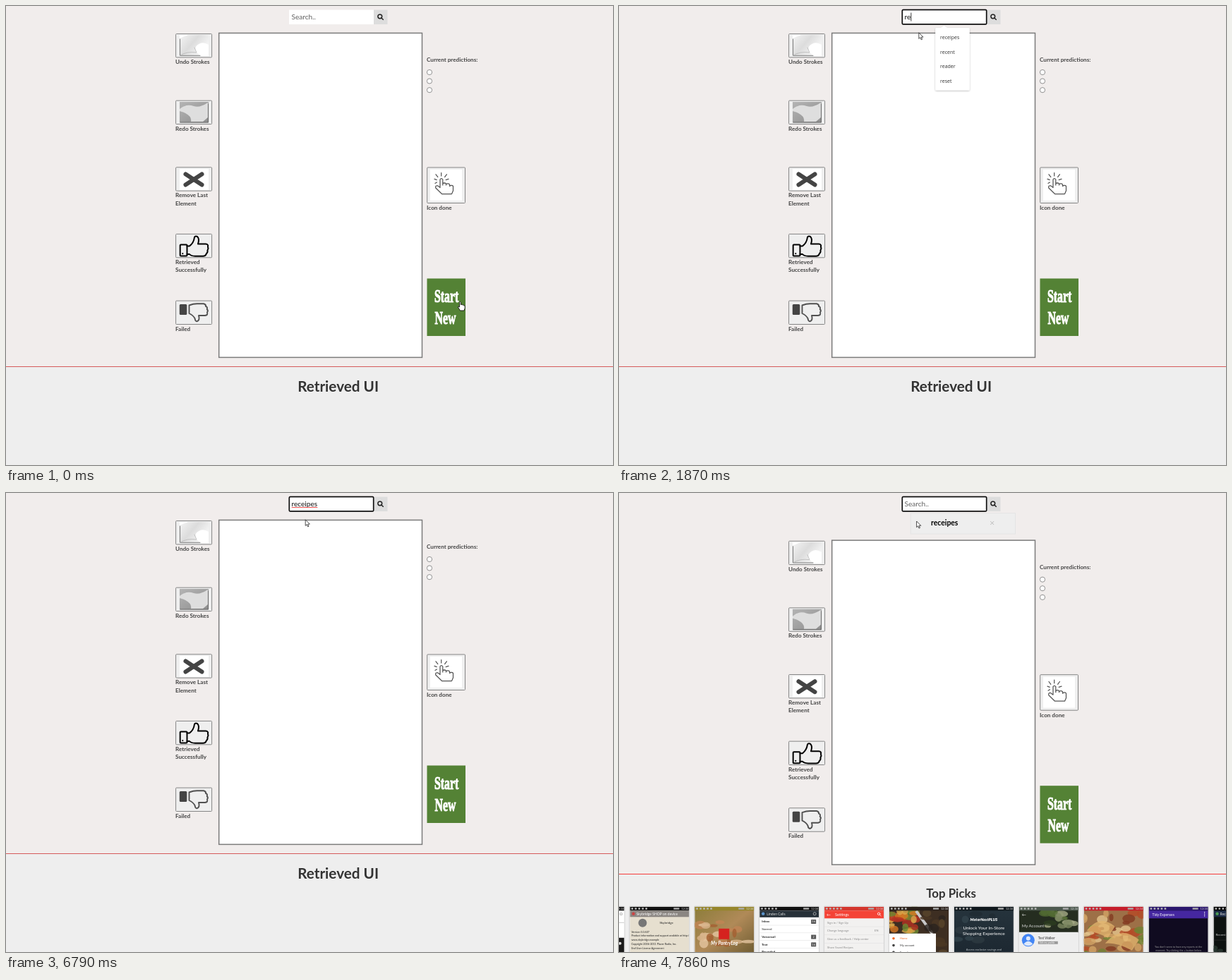
An HTML page for the animation above (7.99 s loop, 860 by 651 pixels).

```html
<!DOCTYPE html>
<html lang="en">
<head>
<meta charset="utf-8">
<title>Sketch search</title>
<style>
html, body { margin: 0; width: 100%; height: 100%; overflow: hidden; background: #eee; }
svg { display: block; width: 860px; height: 651px; font-family: Lato, sans-serif; }
.label { font-size: 8.13px; font-weight: 700; fill: #444; }
.btn { fill: #efefef; stroke: #858585; }
.menu { font: 7px "Open Sans", sans-serif; fill: #333; }
.head { font-weight: 700; fill: #333; text-anchor: middle; }
.line { fill: none; stroke-linecap: round; stroke-linejoin: round; }
</style>
</head>
<body>
<svg id="stage" viewBox="0 0 860 651" width="860" height="651">
  <defs>
    <linearGradient id="undoTone" x2="1" y2=".6"><stop stop-color="#f4f4f4"/><stop offset=".5" stop-color="#dcdcdc"/><stop offset="1" stop-color="#f8f8f8"/></linearGradient>
    <linearGradient id="redoTone" x2="1" y2="1"><stop stop-color="#b4b4b4"/><stop offset="1" stop-color="#8e8e8e"/></linearGradient>
    <linearGradient id="warm" x2="1" y2="1"><stop stop-color="#8b7c3a"/><stop offset=".5" stop-color="#b08a58"/><stop offset="1" stop-color="#6b5a30"/></linearGradient>
    <linearGradient id="navy" x2="0" y2="1"><stop stop-color="#26343d"/><stop offset="1" stop-color="#1c2730"/></linearGradient>
    <filter id="shade" x="-20%" y="-20%" width="140%" height="150%"><feDropShadow dx="0" dy="1" stdDeviation="1.3" flood-opacity=".28"/></filter>
    <clipPath id="card"><rect width="84" height="70"/></clipPath>
  </defs>

  <rect width="860" height="651" fill="#eee"/>
  <rect id="upper" width="860" height="511" fill="#f1edec"/>
  <rect id="rule" width="860" height="1"/>

  <g id="page">
    <rect x="301.7" y="38.4" width="287.8" height="460" fill="#fff" stroke="#7b7b7b" stroke-width="1.5"/>
    <g id="buttons"></g>

    <g id="undo">
      <rect x="246" y="41" width="41" height="30" fill="#fff"/>
      <path d="M246 46L258 41H287V55Q279 50 273 54Q266 58 269 65L275 70H246Z" fill="url(#undoTone)"/>
      <path d="M246.5 47V70.3H275" class="line" stroke="#777"/>
      <path d="M247 70Q256 64 270 66L267 59" class="line" stroke="#b5b5b5" stroke-width=".8"/>
    </g>
    <g id="redo">
      <rect x="246" y="136" width="41" height="29.5" fill="url(#redoTone)"/>
      <path d="M246 146Q255 138 266 142Q274 145 286 137V158L279 164H262Q264 154 246 149Z" fill="#dedede"/>
      <path d="M247 165H286.5V139" class="line" stroke="#666"/>
    </g>

    <rect x="246" y="231" width="41" height="30" fill="#fff"/>
    <path d="M254.5 238.5L277.5 253.5M277.5 238.5L254.5 253.5" class="line" stroke="#444" stroke-width="6"/>

    <g class="line" stroke="#000" stroke-width="2">
      <rect x="246.7" y="338.5" width="9.8" height="16" rx="1"/>
      <path d="M256.5 340.5H260Q266 336 267 328Q268 325.8 271 327Q274.5 330 272 337.5H283Q287 338 286 341.5Q287.2 344 285.5 346.5Q286 350 284 351Q283 354.8 279 354.8H268Q262 354.5 260 352H256.5"/>
      <path d="M250.3 351V351.2"/>
    </g>
    <rect x="245.8" y="423" width="10.5" height="15" rx="1.5" fill="#444"/>
    <path d="M259.5 436V424.5Q266 422 272 422.3H280Q283.5 423 283 426Q286 427 284.7 430Q287 432 285 434.5Q286.5 438.5 282 439H273Q275 446 270.5 447.3Q268 447 267.5 443Q265 438.5 259.5 436Z" class="line" stroke="#505050" stroke-width="1.9"/>

    <text class="label" x="596" y="79.2">Current predictions:</text>
    <g fill="#fff" stroke="#858585" stroke-width=".9">
      <circle cx="600" cy="94" r="3.6"/><circle cx="600" cy="106.5" r="3.6"/><circle cx="600" cy="119.2" r="3.6"/>
    </g>

    <rect class="btn" x="596.7" y="229" width="53.8" height="50.5" rx="1"/>
    <rect x="601" y="232" width="45" height="44" fill="#fff"/>
    <path d="M615 257V246Q616.8 243.2 618.8 246V254V252Q621 250 623.5 252V254V252.8Q626 251 628.5 253V255.5Q631.5 253 633.5 255.5V262L631.5 266.5H617.5L608.8 258Q608 254.5 611.5 254.8L615 257.5M616.7 241V236.5M611.8 242.6L609 238.8M621.6 242.6L624.4 238.8M610.2 246.6L607 245.4M623.2 246.6L627 245.4M610.4 250L608 251.5" class="line" stroke="#555" stroke-width="1.25"/>
    <text class="label" x="596" y="288.9">Icon done</text>

    <rect x="596.5" y="386.5" width="54.5" height="81.5" fill="#548235"/>
    <g fill="#fff" stroke="#fff" stroke-width=".7" font-family="Liberation Serif, serif" font-weight="700" font-size="15.8">
      <text transform="translate(607 420) scale(1 1.6)">Start</text>
      <text transform="translate(607.5 451.3) scale(1 1.6)">New</text>
    </g>
  </g>

  <rect x="521" y="5.5" width="19.5" height="20.5" fill="#ddd"/>
  <g class="line" stroke="#222" stroke-width="1.5"><circle cx="529.8" cy="14.8" r="2.9"/><path d="M532.2 17.2L534.3 19.3"/></g>
  <rect x="401" y="5.5" width="120" height="20.5" fill="#fff"/>
  <rect id="focus" x="401.3" y="5.3" width="119.4" height="20.6" rx="1.5" fill="none" stroke="#101010" stroke-width="1.7"/>
  <text id="query" x="404.5" y="18.9" font-size="10.1"></text>
  <rect id="squiggle" x="404.7" y="20" height="1" fill="#f05050"/>
  <rect id="caret" y="9.5" width=".9" height="12" fill="#222"/>

  <text id="heading" class="head" x="470.6"></text>
  <g id="results">
    <rect x="413.2" y="28.7" width="148.3" height="29.3" fill="#eee" stroke="#e4e4e4"/>
    <text x="442" y="46.4" font-size="10.4" font-weight="700">receipes</text>
    <path d="M526.3 40.2L531 44.9M531 40.2L526.3 44.9" stroke="#b0b0b0" stroke-width=".9"/>
    <g id="slots"></g>
    <g id="cards"></g>
  </g>

  <g id="menu" class="menu">
    <g filter="url(#shade)"><path d="M455 31.5L460.5 28L466 31.5Z" fill="#fff"/><rect id="menuBox" x="448.2" y="31" rx="1.5" fill="#fff"/></g>
    <g id="menuRows"></g>
  </g>

  <g id="hand"><path d="M-2.4 0V-5Q-1.5 -7 -.6 -5V-1.8Q1 -3 1.6 -1.4Q3 -2.2 3.5 -.8Q5.2 -1.4 5.2 .6V3L4 6.5H-1.6L-4.6 1.5Q-4.5 -.4 -2.4 1.5Z" fill="#fff" stroke="#111" stroke-width=".9"/></g>
  <g id="beam" class="line" stroke="#222" stroke-width=".9"><path d="M-2 -4.5H-.6L0 -4L.6 -4.5H2M0 -4V4M-2 4.5H-.6L0 4L.6 4.5H2"/></g>
  <g id="arrow"><path d="M0 0V8.6L2 6.8L3.4 10L4.8 9.4L3.5 6.3H6.2Z" fill="#fff" stroke="#222" stroke-width=".8"/></g>
</svg>

<script>
const LOOP = 7990, SHIFT = 28.7, ENTER = 6930;
const $ = id => document.getElementById(id);
const show = (id, on) => $(id).setAttribute('visibility', on ? 'visible' : 'hidden');
const set = (id, attrs) => { for (const k in attrs) $(id).setAttribute(k, attrs[k]); };
const rect = (x, y, w, h, fill, more = '') => `<rect x="${x}" y="${y}" width="${w}" height="${h}" fill="${fill}" ${more}/>`;
const dot = (x, y, r, fill) => `<circle cx="${x}" cy="${y}" r="${r}" fill="${fill}"/>`;
const text = (x, y, size, fill, s, more = '') => `<text x="${x}" y="${y}" font-size="${size}" fill="${fill}" ${more}>${s}</text>`;
const mid = 'text-anchor="middle"', bold = 'font-weight="700"';

function random(seed) {
  return () => (seed = seed * 16807 % 2147483647) / 2147483647;
}

// soft heap of food-like patches
function food(seed, n, x, y, w, h, tones) {
  const r = random(seed);
  let out = '';
  for (let i = 0; i < n; i++) {
    out += `<ellipse cx="${x + r() * w}" cy="${y + r() * h}" rx="${3 + r() * 7}" ry="${2 + r() * 5}" fill="${tones[i % tones.length]}" opacity=".8"/>`;
  }
  return out;
}

const labels = [['Undo Strokes'], ['Redo Strokes'], ['Remove Last', 'Element'], ['Retrieved', 'Successfully'], ['Failed']];
$('buttons').innerHTML = labels.map((lines, i) => {
  const y = 39.5 + 94.65 * i;
  return `<rect class="btn" x="240.6" y="${y}" width="51" height="33.4" rx="1"/>` +
    lines.map((s, j) => `<text class="label" x="240" y="${y + 42.4 + 11.6 * j}">${s}</text>`).join('');
}).join('');

function statusBar(fill) {
  let out = rect(0, 0, 84, 5.5, fill);
  for (let i = 0; i < 5; i++) out += rect(2 + i * 5, 1.5, 2.6, 2.4, '#bbb');
  return out + rect(62, 1.5, 8, 2.4, '#aaa') + text(73, 4.4, 4, '#ddd', '12:34');
}

const cards = [
  rect(0, 0, 84, 70, '#fff') + statusBar('#111') + text(77, 12, 6, '#777', '⊙') + rect(76, 22, 8, 1, '#ccc') + rect(76, 44, 8, 22, '#1a1a1a') + dot(78, 52, 2, '#ddd'),

  rect(0, 0, 84, 70, '#e6dfcf') + statusBar('#111') + rect(0, 5.5, 84, 9, '#8b8682') +
    dot(5, 10, 2.2, '#c44') + text(9, 12, 5, '#fff', 'Skybridge SHOP on device') +
    dot(18, 23, 6, '#777') + text(42, 24, 4.5, '#222', 'Skybridge') +
    ['Version 5.0.607', 'Product information and support available at http:/', 'www.skybridge.example',
     'Copyright 2006-2011 Plover Radio, Inc.', 'End User License Agreement']
      .map((s, i) => text(2, 37 + i * 5.7, 3.7, '#222', s)).join(''),

  rect(0, 0, 84, 70, 'url(#warm)') + food(17, 20, 8, 17, 68, 38, ['#c28555', '#d9b48b', '#a65f31', '#e5c6a0']) +
    statusBar('#96862c') + rect(34, 31, 15, 15, '#d5231f') + text(42, 54.5, 6.5, '#fff', 'My PantryLog', mid + ' font-style="italic" font-weight="700"'),

  rect(0, 0, 84, 70, '#fff') + statusBar('#111') + rect(0, 5.5, 84, 9.5, '#263038') + dot(5, 10, 2.3, '#5a91c8') +
    text(10, 12, 5, '#ddd', 'Linden Calls') + `<circle cx="78" cy="10" r="2" fill="none" stroke="#bbb" stroke-width=".8"/>` +
    ['Inbox', 'Starred', 'Voicemail', 'Text', 'Recorded'].map((s, i) =>
      text(3, 22.5 + i * 10.8, 4.5, '#222', s, i == 1 ? '' : bold) + rect(0, 26 + i * 10.8, 84, .5, '#ddd') +
      (i == 1 || i == 4 ? '' : rect(73, 18.2 + i * 10.8, 7, 6, '#555') + text(76.5, 22.7 + i * 10.8, 4, '#fff', i == 2 ? 2 : 16, mid))).join(''),

  rect(0, 0, 84, 70, '#f2f1f0') + statusBar('#d4362d') + rect(0, 5.5, 84, 11, '#f44336') + text(3, 13.2, 6, '#fff', '←') +
    text(15, 13, 5.6, '#fff', 'Settings') + `<g class="line" stroke="#fff" stroke-width=".8"><circle cx="77" cy="10" r="1.7"/><path d="M78.3 11.3L80 13"/></g>` +
    ['Sign in / Sign Up', 'Change language', 'Give us a feedback / Help center', 'Share Saved Recipes'].map((s, i) =>
      text(4, 24 + i * 11.6, 4.1, '#888', s) + rect(0, 28 + i * 11.6, 84, .5, '#ddd')).join('') + text(71, 35.5, 4, '#888', 'EN'),

  rect(0, 0, 84, 70, '#3d2e22') + food(41, 28, 0, 5, 38, 30, ['#d77824', '#6e8a32', '#b53122', '#d9a84c']) +
    `<path d="M38 6L61 38" stroke="#c8c8c8" stroke-width="4"/>` + food(9, 10, 52, 5, 30, 60, ['#4b3824', '#59452b', '#2b241e']) +
    statusBar('#2a211b') + rect(0, 38, 66, 32, '#fff') +
    ['Home', 'My account', 'Favorites'].map((s, i) =>
      dot(6, 45 + i * 9.8, 1.8, i ? '#444' : '#f06a25') + text(15, 46.5 + i * 9.8, 4, i ? '#333' : '#f06a25', s)).join(''),

  rect(0, 0, 84, 70, 'url(#navy)') + food(5, 7, 4, 8, 75, 58, ['#33434b', '#202b32', '#2d3a41']) + statusBar('#10181d') +
    text(42, 20.5, 5.6, '#fff', 'MotorNestPLUS', mid + ' font-weight="900" font-style="italic"') +
    text(42, 32, 6.5, '#fff', 'Unlock Your In-Store', mid) + text(42, 40, 6.5, '#fff', 'Shopping Experience', mid) +
    text(42, 62, 4, '#c5ccd0', 'Access exclusive savings and', mid),

  rect(0, 0, 84, 70, '#eee') + rect(0, 0, 84, 37, '#252d20') + food(23, 18, 36, 7, 42, 25, ['#526b32', '#7e8962', '#2c3d20', '#a6aa86']) +
    statusBar('#4e5a50') + rect(0, 36, 84, 34, '#eee') + text(4, 13.5, 6, '#fff', '←') + text(4, 29, 6, '#ddd', 'My Account') +
    dot(13, 47.5, 9, '#4285f4') + dot(13, 45, 3, '#dce8fb') + `<path d="M6.5 53Q13 45 19.5 53Q13 58 6.5 53Z" fill="#dce8fb"/>` +
    text(27, 46, 4.7, '#333', 'Test Walker') + rect(27, 49, 28, 4, '#999') + text(29, 52.2, 3.4, '#fff', 'Edit my profile'),

  rect(0, 0, 84, 70, '#9d7047') + food(77, 46, 0, 8, 84, 60, ['#d3a466', '#b64a26', '#708334', '#e5c68e', '#843a21']) +
    `<path d="M4 34Q22 10 44 28L34 44Q18 36 4 34ZM30 52Q52 25 78 47L68 62Q46 50 30 52Z" fill="#e3b66e" opacity=".75"/>` + statusBar('#c51d2b'),

  rect(0, 0, 84, 70, '#100b20') + statusBar('#29156c') + rect(0, 5.5, 84, 11, '#4527a0') + text(5, 13, 5, '#fff', 'Tidy Expenses') +
    [8, 10.5, 13].map(y => dot(79, y, .7, '#fff')).join('') +
    text(42, 58, 3.7, '#999', 'You don’t seem to have any reports at the', mid) + text(42, 63, 3.7, '#999', 'moment. Try clicking the + button below', mid),

  rect(0, 0, 84, 70, '#0d1210') + statusBar('#000') + rect(0, 5.5, 84, 9, '#1d2b45') + dot(5, 10, 2.2, '#4b9b52') + text(9, 12, 5, '#ddd', 'Recipes') +
    text(3, 41, 4.5, '#ccc', 'Recent') + rect(0, 47, 84, .6, '#333') + food(3, 3, 1, 54, 14, 12, ['#283830'])
];

const cardX = i => 14.6 + 91.9 * (i - 1);
$('slots').innerHTML = cards.map((_, i) => rect(cardX(i), 586, 85.3, 80, '#eee', 'rx="1.5" stroke="#d2d2d2"')).join('');
$('cards').innerHTML = cards.map((c, i) => `<g transform="translate(${cardX(i) + .8} 586.8)"><g clip-path="url(#card)">${c}</g></g>`).join('');

const typing = [[1340, 1], [1470, 2], [2950, 3], [3150, 4], [4410, 5], [4870, 6], [5010, 7], [5270, 8], [ENTER, 0]];
const carets = [[930, 2000], [2540, 3680], [4210, 5800], [6330, 6790], [7330, 7860]];
const wavy = [[4140, 4410], [6260, ENTER]];
const menus = [
  [1010, 'setting cat editor receipes headphones hi'],
  [1340, 'receipes recent reader reset'],
  [2950, 'receipes recent'],
  [4410, 'receipes'],
  [5410, '']
];
const latest = (list, t) => list.reduce((v, e) => t >= e[0] ? e[1] : v, undefined);
const within = (list, t) => list.some(([a, b]) => t >= a && t < b);

// share of a move done when it advances in n jumps from a to b
function steps(t, a, b, n) {
  if (t < a) return 0;
  return Math.min(1, (Math.floor((t - a) / (b - a) * (n - 1) + 1e-6) + 1) / n);
}

function pointer(t) {
  if (t < 60) return [645, 425.5, 'hand'];
  if (t < 1210) {
    const p = steps(t, 60, 660, 10), q = p * p * (3 - 2 * p) - 1;
    const x = 645 - 207.5 * (1 + 2.3 * q ** 3 + 1.3 * q * q);
    const y = 425.5 - 403 * (1 - q * q);
    return [x, y, x > 596 && y > 386 ? 'hand' : x < 521 && y < 27 ? 'beam' : 'arrow'];
  }
  const p = steps(t, 1210, 1400, 4), end = steps(t, 7260, 7460, 4);
  const y = 22.5 + 15.3 * p + 2.2 * end;
  const x = 437.5 - 12.5 * p - .4 * steps(t, 1870, 2000, 2) - (t >= 4140 ? .4 : 0) - 2.6 * end;
  return [x, y, y < 27 ? 'beam' : 'arrow'];
}

function drawMenu(t) {
  const rows = (latest(menus, t) || '').split(' ').filter(Boolean);
  show('menu', rows.length);
  if (!rows.length) return;
  set('menuBox', { width: rows.length > 4 ? 62.2 : 48.5, height: 6 + 20.6 * rows.length });
  set('menu', { opacity: 1 - steps(t, 5270, 5410, 3) });
  $('menuRows').innerHTML = rows.map((s, i) => `<text x="455" y="${47 + 20.6 * i}">${s}</text>`).join('');
}

function draw(t) {
  const done = t >= ENTER, word = 'receipes'.slice(0, latest(typing, t) || 0);
  set('page', { transform: `translate(0 ${done ? SHIFT : 0})` });
  set('upper', { height: done ? 540 : 511 });
  set('rule', { y: done ? 540 : 511, fill: done ? '#f53b3b' : '#d65a5a' });
  set('heading', { y: done ? 573.6 : 547, 'font-size': done ? 16.9 : 20.7 });
  $('heading').textContent = done ? 'Top Picks' : 'Retrieved UI';
  show('results', done);
  const loaded = steps(t, 7260, 7460, 4) * cards.length;
  [...$('cards').children].forEach((c, i) => c.setAttribute('display', i < loaded ? 'inline' : 'none'));

  $('query').textContent = word || 'Search..';
  set('query', { fill: word ? '#111' : '#606060' });
  const width = word ? $('query').getComputedTextLength() : 0;
  set('squiggle', { width });
  set('caret', { x: 404.6 + width });
  show('squiggle', within(wavy, t));
  show('caret', within(carets, t));
  show('focus', t >= 930);
  drawMenu(t);

  const [x, y, kind] = pointer(t);
  for (const id of ['hand', 'beam', 'arrow']) show(id, id == kind);
  set(kind, { transform: `translate(${x} ${y})` });
}

function tick() {
  draw(performance.now() % LOOP);
  requestAnimationFrame(tick);
}
tick();
</script>
</body>
</html>
```
